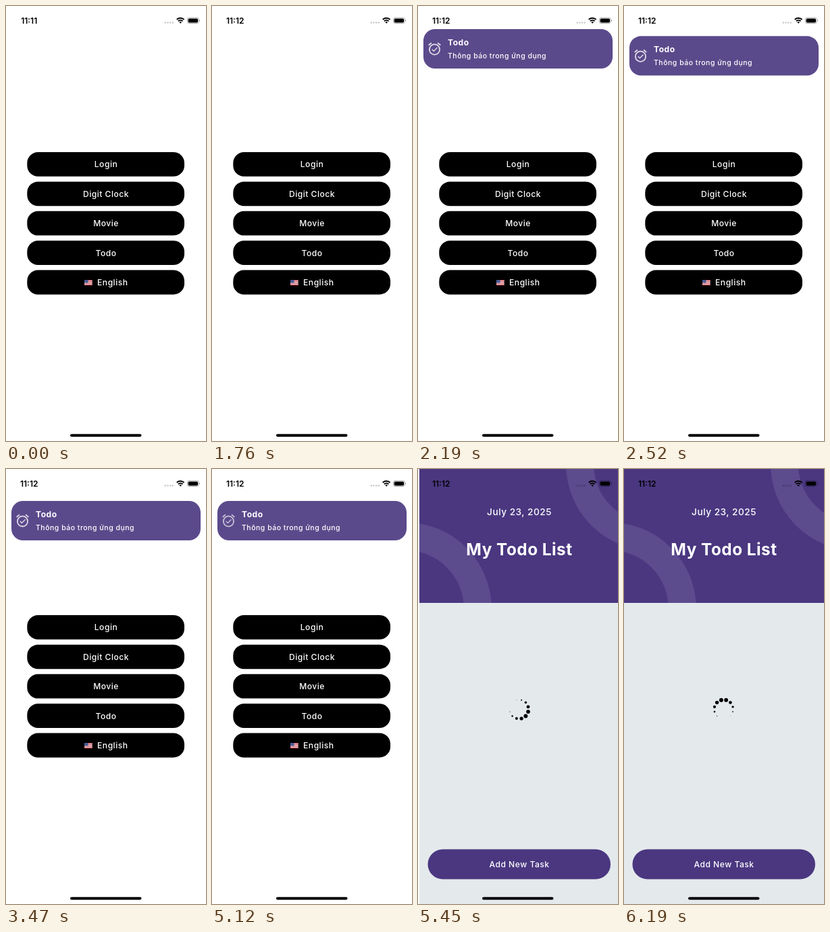
An HTML page that plays this animation: 296x640 px, repeating every 7.51 s.

```html
<!DOCTYPE html>
<html lang="en">
<head>
<meta charset="utf-8">
<title>Todo app</title>
<style>
  html, body { margin: 0; width: 100%; height: 100%; overflow: hidden; background: #fff; }
  svg { display: block; width: 100vw; height: 100vh; }
  text { font: 500 12.1px Inter, "Open Sans", sans-serif; letter-spacing: .5px; fill: #fff; }
  .mid { text-anchor: middle; }
  .clock { font-weight: 600; font-size: 12px; letter-spacing: 0; fill: #000; }
  .bold { font-weight: 700; }
  .small { font-size: 10.5px; }
  .date { font-size: 13.66px; }
  .heading { font-weight: 700; font-size: 24.3px; }
  .ring { fill: none; stroke: #5c4b8d; stroke-width: 41; }
</style>
</head>
<body>
<svg viewBox="0 0 296 640">
  <clipPath id="headerClip"><rect width="296" height="197"/></clipPath>

  <rect width="296" height="640" fill="#fff"/>
  <g id="menu"></g>
  <g transform="translate(116 403)">
    <rect width="11.5" height="8" fill="#f0e4e6"/>
    <path d="M0 .6H11.5M0 2.9H11.5M0 5.2H11.5M0 7.4H11.5" stroke="#d0505c" stroke-width="1.1"/>
    <rect width="5.5" height="4.4" fill="#4a5c94"/>
  </g>

  <g id="banner">
    <rect x="8" width="280" height="58" rx="17" fill="#5b4a8b"/>
    <g id="alarm" transform="translate(13.1 17.6) scale(.95)" fill="none" stroke="#fff" stroke-width="1.9">
      <circle cx="12" cy="13" r="8"/>
      <path d="M2.7 6.5 7.2 2.7M16.8 2.7 21.3 6.5"/>
      <path d="M8 12.8l2.8 2.8 5.4-5.4" stroke-width="1.5"/>
    </g>
    <text class="bold" x="44" y="24">Todo</text>
    <text class="small" x="44" y="43">Thông báo trong ứng dụng</text>
  </g>

  <g id="page">
    <rect width="296" height="640" fill="#e4e9ec"/>
    <g clip-path="url(#headerClip)">
      <rect width="296" height="197" fill="#4a3780"/>
      <circle class="ring" cx="-20" cy="205.7" r="106.5"/>
      <circle class="ring" cx="344" cy="-7" r="106.5"/>
    </g>
    <text class="mid date" x="148" y="68">July 23, 2025</text>
    <text class="mid heading" x="148" y="127">My Todo List</text>
    <g id="spinner" transform="translate(147.5 353.5)"></g>
    <rect x="12.5" y="559.5" width="270.5" height="44" rx="22" fill="#4a3780"/>
    <text class="mid" x="148" y="586">Add New Task</text>
  </g>

  <text id="clock" class="mid clock" x="34.2" y="25.6"></text>
  <g fill-opacity=".22">
    <circle cx="235.7" cy="24.4" r="1.25"/><circle cx="239.4" cy="24.4" r="1.25"/>
    <circle cx="243.1" cy="24.4" r="1.25"/><circle cx="246.8" cy="24.4" r="1.25"/>
  </g>
  <g fill="none" stroke="#000" stroke-width="1.9">
    <path d="M252.8 20a7.6 7.6 0 0 1 10.8 0M254.9 22.3a4.7 4.7 0 0 1 6.6 0"/>
    <path d="M256.4 23.9a2.6 2.6 0 0 1 3.6 0L258.2 25.7Z" fill="#000" stroke="none"/>
  </g>
  <rect x="268.4" y="17.2" width="16.8" height="8.4" rx="2.6" fill="none" stroke="#000" stroke-opacity=".4" stroke-width=".8"/>
  <rect x="269.6" y="18.4" width="14.4" height="6" rx="1.6"/>
  <path d="M286.1 20v2.8q1-.4 1-1.4t-1-1.4z" fill-opacity=".45"/>
  <rect x="95" y="629.7" width="105.5" height="4" rx="2"/>
</svg>
<script>
const LOOP = 7510, START = 1760, STEP = 108.05, LAST_STEP = 41;
const SLIDE_STEP = 31, DOTS = 12;
const byId = id => document.getElementById(id);
const clamp = (v, lo, hi) => Math.min(hi, Math.max(lo, v));

function add(parent, tag, attrs, text = '') {
  const node = document.createElementNS(parent.namespaceURI, tag);
  for (const key in attrs) node.setAttribute(key, attrs[key]);
  node.textContent = text;
  return parent.appendChild(node);
}

const menu = byId('menu'), spinner = byId('spinner');
['Login', 'Digit Clock', 'Movie', 'Todo', 'English'].forEach((label, i) => {
  const y = 215 + i * 43.4;
  add(menu, 'rect', { x: 31.3, y, width: 232.7, height: 35.8, rx: 16 });
  add(menu, 'text', { class: 'mid', x: i === 4 ? 157.8 : 148, y: y + 22.3 }, label);
});

const dots = Array.from({ length: DOTS }, (_, i) => {
  const angle = (i + .5) * 2 * Math.PI / DOTS;
  const node = add(spinner, 'circle', { cx: 14 * Math.sin(angle), cy: -14 * Math.cos(angle) });
  return { angle, node };
});

function render(time) {
  // The screen updates in even steps and rests at both ends of the loop.
  const step = clamp(Math.floor((time - START + 5) / STEP), -1, LAST_STEP);
  byId('clock').textContent = step < 0 ? '11:11' : '11:12';

  const bannerY = 47 - 107 * .59 ** Math.max(step, 0);
  byId('banner').setAttribute('transform', `translate(0 ${bannerY})`);
  byId('alarm').setAttribute('opacity', .8 - .15 * clamp((step - 14) / 14, 0, 1));

  const slide = step - SLIDE_STEP;
  const pageX = slide > 4 ? 0 : 296 * .189 ** Math.max(slide, 0);
  byId('page').setAttribute('transform', `translate(${pageX} 0)`);

  // The largest dot travels clockwise once every 1200 ms.
  const peak = Math.PI / 3 + (slide - 1) * STEP / 1200 * 2 * Math.PI;
  for (const { angle, node } of dots)
    node.setAttribute('r', 3 * (1 + Math.cos(angle - peak)) / 2);
}

const origin = performance.now();
function tick() {
  render((performance.now() - origin) % LOOP);
  requestAnimationFrame(tick);
}
tick();
</script>
</body>
</html>
```
